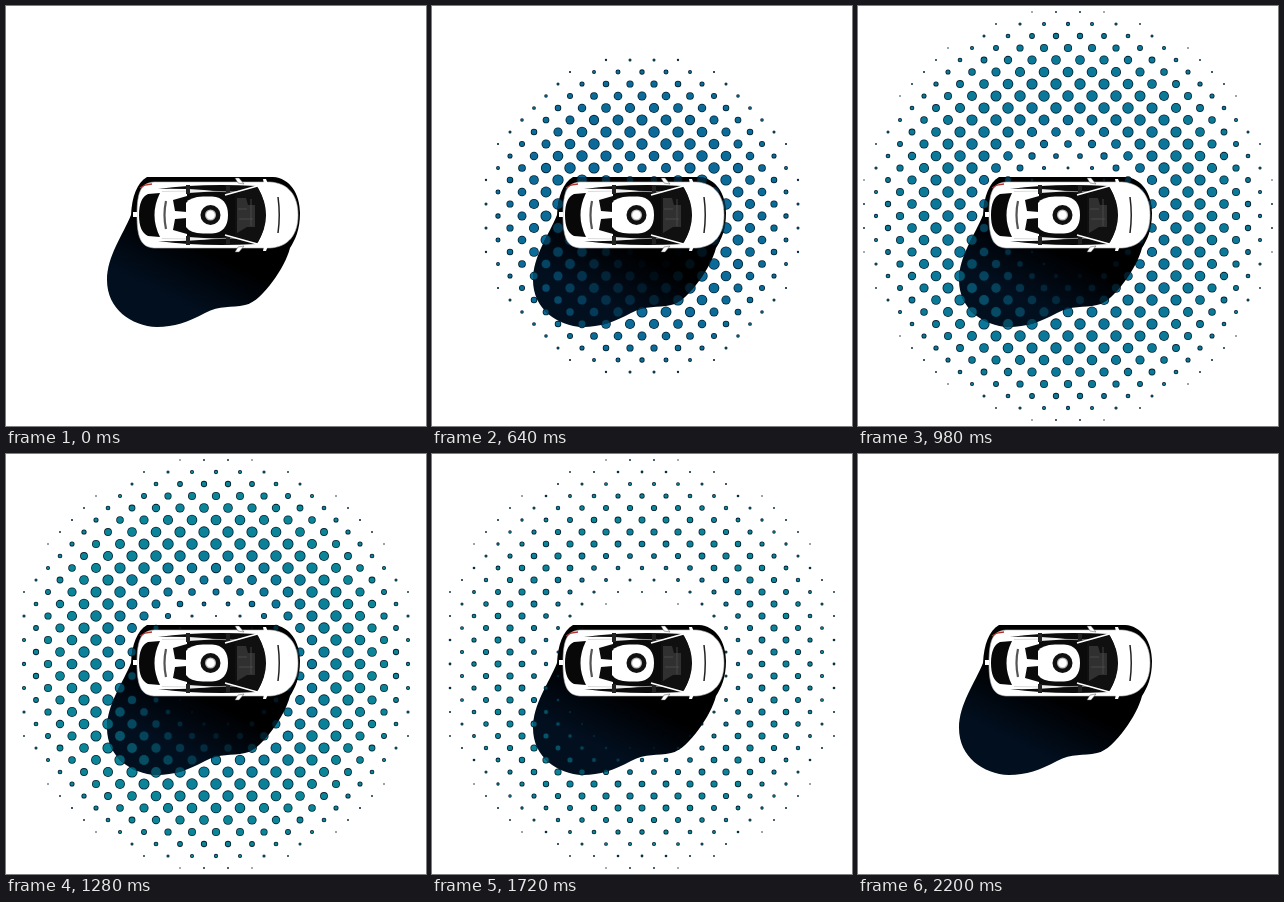
Write an HTML page with a canvas that moves like this. It is 420 by 420 pixels and loops after 2.4 s.

```html
<!DOCTYPE html>
<html lang="en">
<head>
<meta charset="utf-8">
<title>Car with halftone pulse</title>
<style>
html, body { margin: 0; width: 100%; height: 100%; overflow: hidden; background: #fff; }
canvas { display: block; width: 420px; height: 420px; }
</style>
</head>
<body>
<canvas id="stage" width="420" height="420"></canvas>
<script>
const ctx = document.getElementById('stage').getContext('2d');
const LOOP = 2400, START = 480, END = 2200, CENTER = 210, STEP = 12;

const clamp = v => Math.max(0, Math.min(1, v));
const ramp = v => Math.sin(clamp(v) * Math.PI / 2);
const smooth = v => (v = clamp(v)) * v * (3 - 2 * v);

function keyed(t, keys) {
  let i = 1;
  while (i < keys.length - 1 && t > keys[i][0]) i++;
  const [t0, a] = keys[i - 1], [t1, b] = keys[i];
  return a + (b - a) * clamp((t - t0) / (t1 - t0));
}

const shadow = new Path2D(`M141 171 H267 C284 172 294 188 294 207 C294 224 289 234 284 242
  C281 253 275 264 267 275 C258 287 249 297 239 299 C225 302 214 299 199 307
  C182 316 168 321 151 321 C125 320 101 303 101 274 C101 250 117 229 125 209
  C126 190 131 177 141 171Z`);
const shadowFill = ctx.createLinearGradient(200, 245, 174, 297);
shadowFill.addColorStop(0, '#000001');
shadowFill.addColorStop(1, '#020f1f');

const dots = [];
for (let j = -17; j <= 17; j++)
  for (let i = -17; i <= 17; i++)
    if ((i + j) % 2 === 0) dots.push({
      x: CENTER + i * STEP, y: CENTER + j * STEP, d: Math.hypot(i, j) * STEP,
      side: Math.abs(i) === 17, cap: Math.abs(j) === 17
    });

function drawDots(t, shaded) {
  const outer = 30 + 184 * (1 - (1 - clamp((t - START) / 520)) ** 4);
  const inner = keyed(t, [[480, -60], [640, 0], [800, 32], [1280, 39], [1600, 58], [1860, 70], [2200, 76]]);
  const scale = 1 - smooth((t - 1400) / 800);
  const age = clamp((t - START) / 800);
  for (const { x, y, d, side, cap } of dots) {
    if (d > 209 || side && t > 1000 && t < 2080 || cap && (t < 830 || t > 2080)) continue;
    const full = 5.7 * ramp((outer - d) / 90) * ramp((d - inner) / 80);
    const r = Math.max(full * scale, Math.min(full, 1));
    if (r < .5) continue;
    ctx.globalAlpha = shaded ? .75 * clamp((Math.hypot(x - 225, y - 235) - 20) / 130) : 1;
    disc(x, y, r, '#02202f');
    if (r > 1.1) disc(x, y, r - .8, `hsl(${201 - 13 * age * clamp(d / 150)},87%,32%)`);
  }
  ctx.globalAlpha = 1;
}

function disc(x, y, r, color) {
  ctx.beginPath();
  ctx.arc(x, y, r, 0, 2 * Math.PI);
  ctx.fillStyle = color;
  ctx.fill();
}

function shape(d, fill, stroke, width = 1) {
  const path = new Path2D(d);
  if (fill) { ctx.fillStyle = fill; ctx.fill(path); }
  if (stroke) { ctx.strokeStyle = stroke; ctx.lineWidth = width; ctx.stroke(path); }
}

function drawCar() {
  shape(`M148 176 H264 C282 177 292 189 292 209 C292 229 282 241 264 242 H148
    C136 241 131 234 131 209 C131 184 136 177 148 176Z`, '#fff', '#bbb', .6);
  shape('M127 206 h4 v5 h-4Z', '#fff');
  shape('M134 182 L139 179 L146 178', null, '#b2322c', 1.3);
  // Rear window
  shape('M154 187 Q143 209 154 231 L142 230 Q133 226 133 209 Q133 192 142 188Z', '#080808');
  // Cabin, with the side windows left dark
  shape('M152 183 Q195 177 251 180 Q268 209 251 238 Q195 241 152 235 Q195 236 228 230 V188 Q195 182 152 183Z', '#0b0b0b');
  shape('M181 187 L232 184 V234 L181 231Z', '#0b0b0b');
  shape('M160 195 Q157 209 160 223', null, '#555', 2.2);
  shape('M167 194 L181 190 V206 L169 205Z M167 224 L181 228 V212 L169 213Z', '#0b0b0b');
  shape('M156 185.5 Q195 184 230 186 M156 232.5 Q195 234 230 232', null, '#ccc', .7);
  shape('M182 179 V188 M182 230 V239 M222 179 V188 M222 230 V239', null, '#222', 4);
  // Roof unit
  shape(`M180 197 Q184 191 197 190.5 H206 C217 191 222 198 222 209
    C222 220 217 227 206 227.5 H197 Q184 227 180 221Z`, '#fff');
  disc(204.5, 209, 10, '#101010');
  disc(204.5, 209, 5.5, '#bbb');
  disc(204.5, 209, 4.3, '#fff');
  // Windshield and seats
  shape('M229 187 L252 182 Q268 209 252 236 L229 231Z', '#101010');
  shape('M231 192 h9 l2 7 h7 v22 h-8 l-10 6Z', '#303030');
  shape('M232 203 h9 M233 213 h14 M245 193 v27', null, '#505050', .8);
  shape('M219 189 L255 179 M219 229 L255 239', null, '#fff', 1.6);
  // Mirrors, lamps and hood
  shape('M229 172 l4 0 l5 6 l-6 -1Z M229 246 l4 0 l5 -6 l-6 1Z', '#fff', '#555', .5);
  shape('M257 173 h3 l2 5 h-4Z M257 245 h3 l2 -5 h-4Z', '#fff');
  shape('M272 191 Q274.5 209 272 227', null, '#222', 1.5);
}

function frame() {
  const t = Math.floor(performance.now() % LOOP / 20) * 20;
  const active = t >= START && t < END;
  ctx.fillStyle = '#fff';
  ctx.fillRect(0, 0, 420, 420);
  if (active) drawDots(t, false);
  ctx.fillStyle = shadowFill;
  ctx.fill(shadow);
  if (active) {
    ctx.save();
    ctx.clip(shadow);
    drawDots(t, true);
    ctx.restore();
  }
  drawCar();
  requestAnimationFrame(frame);
}
frame();
</script>
</body>
</html>
```
